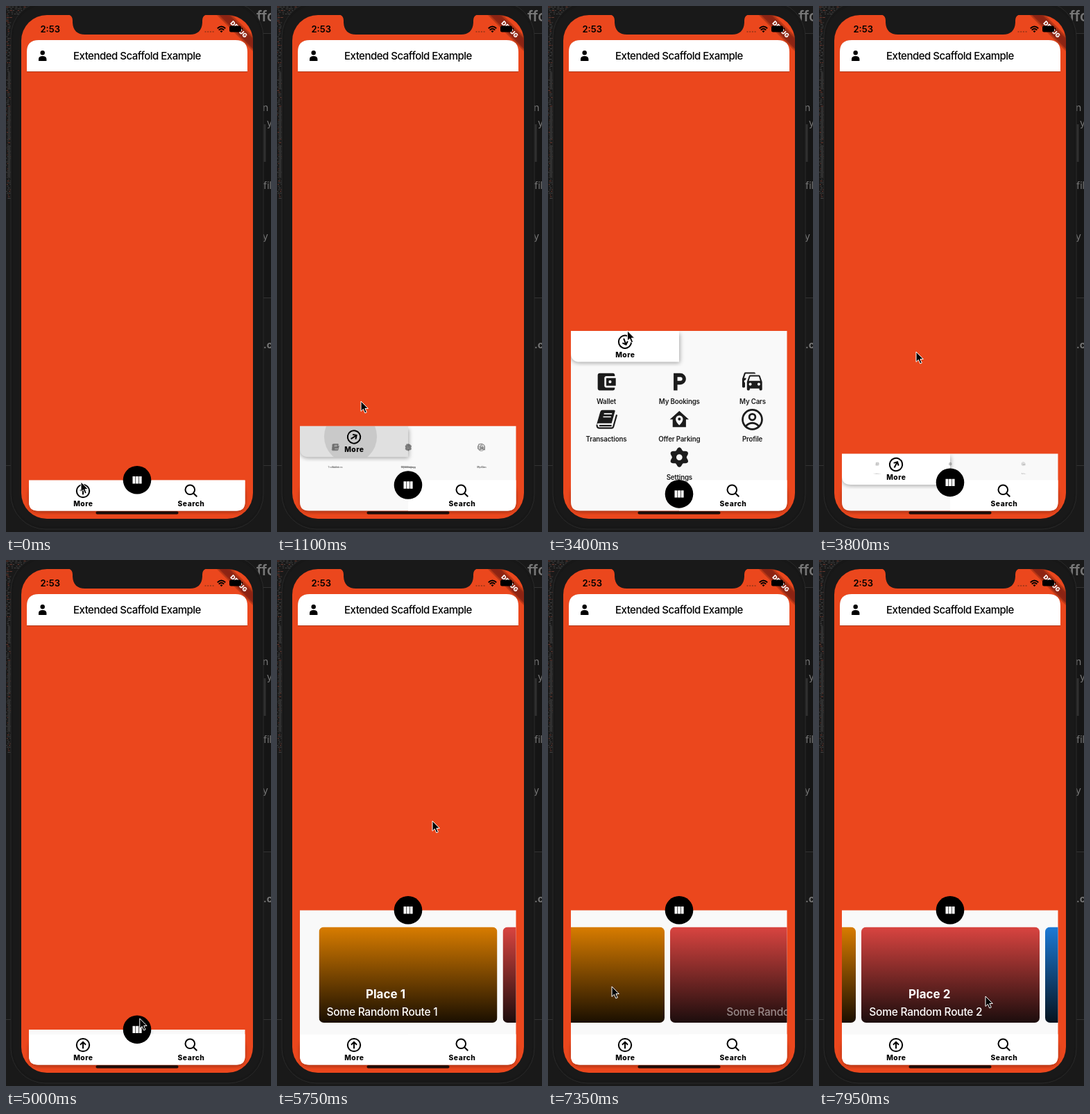
These frames come from a looping animation (382 by 756 pixels, 8000 ms). An HTML page:

```html
<!DOCTYPE html>
<html lang="en">
<head>
<meta charset="utf-8">
<title>Extended Scaffold Example</title>
<style>
html, body { margin: 0; width: 100%; height: 100%; overflow: hidden; background: #191919; }
svg { display: block; width: 100vw; height: 100vh; }
text { font-family: Inter, Roboto, sans-serif; }
.nav { font-size: 10.3px; font-weight: 800; letter-spacing: .5px; text-anchor: middle; }
.item { font-size: 11px; font-weight: 600; letter-spacing: -.2px; text-anchor: middle; fill: #1c1c1c; }
.line { fill: none; stroke: #000; stroke-width: 2; }
.place { font-size: 17px; font-weight: 700; }
.route { font-size: 15.5px; font-weight: 500; letter-spacing: -.25px; }
.side { fill: #777; font-size: 14px; }
</style>
</head>
<body>
<svg viewBox="0 0 382 756">
  <defs>
    <clipPath id="screenClip"><rect x="22" y="13" width="334" height="724" rx="37"/></clipPath>
    <clipPath id="panelClip"><path id="panelShape"/></clipPath>
    <clipPath id="tabClip"><path d="M33 0H189V44.5H46Q33 44.5 33 32Z"/></clipPath>
    <filter id="blur"><feGaussianBlur stdDeviation="3"/></filter>
  </defs>

  <rect width="382" height="756" fill="#191919"/>
  <rect x="372" y="40" width="10" height="380" fill="#151515"/>
  <path d="M366 39.5H382M366 419.5H382M366 660.5H382M0 660.5H10" stroke="#333"/>
  <g id="specks"></g>
  <path d="M4.5 95V120M4.5 145V191M4.5 200V247M373 170V224" stroke="#303030" stroke-width="3"/>
  <g class="side">
    <text x="361" y="22" font-size="21" font-weight="600">ffold</text>
    <text x="370" y="151">n</text>
    <text x="376" y="173">y</text>
    <text x="371" y="263">file</text>
    <text x="370" y="336">y</text>
    <text x="371" y="492" font-weight="700">.co</text>
  </g>
  <rect x="7" y="-6" width="364" height="758" rx="50" fill="#171717" stroke="#2a2a2a"/>
  <rect x="10" y="-1" width="358" height="749" rx="46" fill="#191919"/>

  <g clip-path="url(#screenClip)">
    <rect x="22" y="13" width="334" height="724" fill="#eb471d"/>
    <path d="M88 12Q96 13 96 21V24Q97 41 114 41H265Q282 41 283 24V21Q283 13 291 12Z" fill="#191919"/>
    <text x="49.5" y="38" font-size="13" font-weight="600">2:53</text>
    <path d="M286.5 37H300" stroke="#a83818" stroke-width="2" stroke-dasharray="2 1.7"/>
    <g transform="translate(356 13) rotate(45)">
      <rect x="-40" y="23" width="80" height="12" fill="#000" opacity=".5" filter="url(#blur)"/>
      <rect x="-40" y="24" width="80" height="10.3" fill="#8f2415" opacity=".8"/>
      <text y="32" font-size="8.7" font-weight="900" fill="#fff" text-anchor="middle">DEBUG</text>
    </g>
    <path d="M304.8 32.3Q310.5 26.8 316.2 32.3M306.8 34.6Q310.5 31 314.2 34.6" class="line" stroke-width="1.8"/>
    <path d="M308.5 36Q310.5 34.3 312.5 36L310.5 38.2Z"/>
    <rect x="322" y="28.5" width="17" height="9" rx="2.5"/>
    <path d="M340.5 31.5V34.5" stroke="#000" stroke-width="1.2"/>

    <path d="M30 95V66Q30 49 47 49H331Q348 49 348 66V95Z" opacity=".25"/>
    <path d="M30 94V66Q30 49 47 49H331Q348 49 348 66V94Z" fill="#fff"/>
    <circle cx="52.7" cy="67.3" r="3.2"/>
    <path d="M47 79V76Q47.3 72 52.7 72T58.4 76V79Z"/>
    <text x="97" y="77" font-size="15" font-weight="500" letter-spacing="-.5">Extended Scaffold Example</text>

    <rect x="34" y="690" width="310" height="37" rx="12" opacity=".35" filter="url(#blur)"/>
    <g clip-path="url(#panelClip)">
      <rect x="33" y="400" width="312" height="326" fill="#f9f9f9"/>
      <g id="cards"></g>
      <path id="navRight" d="M189 681.5H345V726H189Z" fill="#fff"/>
      <g id="tab">
        <path id="tabShadow" d="M33 4H190V46H46Q33 46 33 34Z" filter="url(#blur)"/>
        <g clip-path="url(#tabClip)">
          <rect x="33" width="156" height="45" fill="#fff"/>
          <g id="press">
            <rect x="33" width="156" height="45" opacity=".12"/>
            <circle id="ripple" cx="106" cy="15" opacity=".1"/>
          </g>
        </g>
        <g id="arrow" class="line">
          <circle r="9.2"/>
          <path d="M0 5.2V-4M-4 -.3L0 -4.3L4 -.3"/>
        </g>
        <text x="111.3" y="37.5" class="nav">More</text>
      </g>
      <g id="items"></g>
      <circle cx="265.3" cy="695.3" r="6.8" class="line"/>
      <path d="M270.2 700.2L275.3 705.3" class="line"/>
      <text x="267" y="718.7" class="nav">Search</text>
    </g>
    <rect x="129.500" y="726.300" width="119" height="4.200" rx="2.100" fill="#1d0d09"/>
    <g id="fab">
      <circle r="20.300"/>
      <path d="M-6.500 -5.200h3.900v10.400h-3.900zM-1.900 -5.200h3.900v10.400h-3.900zM2.700 -5.200h3.900v10.400h-3.900z" fill="#fff"/>
    </g>
  </g>
  <path id="cursor" d="M0 0V14.500L3.400 11.400L5.800 17L8.300 16L5.900 10.500H10.300Z" stroke="#fff" stroke-width="1"/>
</svg>
<script>
const $ = id => document.getElementById(id);
const clamp = v => Math.max(0, Math.min(1, v));
const ease = u => u < .5 ? 2 * u * u : 1 - 2 * (1 - u) ** 2;
const ramp = (t, start, length) => ease(clamp((t - start) / length));
const move = (el, x, y, more = '') => el.setAttribute('transform', `translate(${x} ${y}) ${more}`);

// Eased position along [time, x, y] stops
function along(stops, t) {
  let i = 1;
  while (i < stops.length - 1 && t > stops[i][0]) i++;
  const a = stops[i - 1], b = stops[i];
  const u = ramp(t, a[0], b[0] - a[0]);
  return a.slice(1).map((v, k) => v + (b[k + 1] - v) * u);
}

// Dim editor text behind the phone
let seed = 7;
const random = () => (seed = seed * 16807 % 2147483647) / 2147483647;
let specks = '';
for (let y = 1; y < 278; y += 2.5) {
  const wide = y < 12 ? 32 : 6;
  for (let x = random() * 3; x < wide; x += 3 + random() * 4)
    specks += `<rect x="${x}" y="${y}" width="${1 + random() * 3}" height="1" fill="${random() < .3 ? '#6b3a30' : '#454545'}"/>`;
}
$('specks').innerHTML = specks;

const gear = Array.from({length: 72}, (_, i) => {
  const a = i * Math.PI / 36, r = 9 + 1.4 * Math.cos(6 * a);
  return `${12 + r * Math.sin(a)} ${12 - r * Math.cos(a)}`;
}).join('L');

const shape = d => `<path fill-rule="evenodd" d="${d}"/>`;
const icons = {
  wallet: shape('M21 18v1c0 1.1-.9 2-2 2H5c-1.1 0-2-.9-2-2V5c0-1.1.9-2 2-2h14c1.1 0 2 .9 2 2v1h-9c-1.1 0-2 .9-2 2v8c0 1.1.9 2 2 2zM12 16h10V8H12zM16 13.5a1.5 1.5 0 0 1 0-3a1.5 1.5 0 0 1 0 3z'),
  parking: shape('M13 3H6v18h4v-6h3a6 6 0 0 0 0-12zM13.2 11H10V7h3.2a2 2 0 0 1 0 4z'),
  cars: shape('M8 11L9.5 6.5H18.5L20 11ZM18.5 16a1.5 1.5 0 0 1 0-3a1.5 1.5 0 0 1 0 3ZM9.5 16a1.5 1.5 0 0 1 0-3a1.5 1.5 0 0 1 0 3ZM19.9 6Q19.500 5 18.500 5H9.500Q8.500 5 8.100 6L6 12V20Q6 21 7 21H8Q9 21 9 20V19H19V20Q19 21 20 21H21Q22 21 22 20V12Z')
    + shape('M14.900 3Q14.500 2 13.500 2H4.500Q3.500 2 3.100 3L1 9V17Q1 18 2 18H3Q4 18 4 17V12.900Q2.800 12.300 3.100 11Q3.500 10 4.600 10L5.300 8H3L4.500 3.500H15.100Z'),
  book: shape('M7.600 2H20.300Q21.600 2 21.200 3.400L17.600 16H4.200Q1.800 16 1.600 18L5.600 4Q6.200 2 7.600 2Z')
    + '<path d="M2.200 17.300Q2 20.800 4.500 21H17.600Q19 21 19.400 19.700L23 7M4.600 18.400H17.600" fill="none" stroke="#1c1c1c" stroke-width="1.600"/><path d="M9.600 6H18M8.700 9.200H17" stroke="#f9f9f9" stroke-width="1.200"/>',
  home: shape('M12 3L2 12H5V20H19V12H22ZM12 7.700a3.800 3.800 0 0 1 3.800 3.800C15.800 14.500 12 18 12 18S8.200 14.500 8.200 11.500A3.800 3.800 0 0 1 12 7.700ZM12 10a1.500 1.500 0 0 0 0 3a1.500 1.500 0 0 0 0-3Z'),
  profile: '<g fill="none" stroke="#1c1c1c" stroke-width="2"><circle cx="12" cy="12" r="10.200"/><circle cx="12" cy="9.300" r="3.200"/><path d="M5.300 18.800Q8 15.600 12 15.600T18.700 18.800"/></g>',
  gear: shape(`M${gear}ZM12 8.800a3.200 3.200 0 0 0 0 6.400a3.200 3.200 0 0 0 0-6.400Z`)
};
const items = [
  ['wallet', 'Wallet', 84, 0], ['parking', 'My Bookings', 189.300, 0], ['cars', 'My Cars', 295, 0],
  ['book', 'Transactions', 84, 1], ['home', 'Offer Parking', 189.300, 1], ['profile', 'Profile', 294.500, 1],
  ['gear', 'Settings', 189.300, 2]
];
$('items').innerHTML = items.map(([icon, label]) =>
  `<g fill="#1c1c1c"><g transform="scale(1.55) translate(-12 -12)">${icons[icon]}</g></g><text class="item">${label}</text>`).join('');

const pitch = 265;
const colors = [['#d87c00', '#1a0f00'], ['#d94440', '#1c0d0d'], ['#1c7ad6', '#05131f']];
$('cards').innerHTML = colors.map(([top, end], i) => `<g>
  <linearGradient id="shade${i}" x2="0" y2="1"><stop stop-color="${top}"/><stop offset="1" stop-color="${end}"/></linearGradient>
  <clipPath id="card${i}"><rect width="257" height="137.500" rx="7"/></clipPath>
  <g clip-path="url(#card${i})" fill="#fff"><rect width="257" height="137.500" fill="url(#shade${i})"/>
  <text y="102" class="place">Place ${i + 1}</text><text y="127" class="route">Some Random Route ${i + 1}</text></g></g>`).join('');
const cards = [...$('cards').children];

const pointer = [
  [0, 108, 684], [700, 108, 684], [1100, 121, 568], [1750, 152, 419], [2300, 152, 419],
  [2650, 107, 458], [3200, 107, 458], [3800, 140, 497], [4000, 162, 640], [4500, 190, 684],
  [4850, 190, 684], [5600, 224, 375], [5850, 224, 375], [6550, 242, 626], [6750, 242, 626],
  [7350, 92, 613], [7500, 92, 613], [7900, 240, 627], [8000, 240, 627]
];
const swipe = [[0, 0], [6750, 0], [7350, 149.500], [7800, 264.500], [8000, 264.500]];

function draw(t) {
  const menu = ramp(t, 750, 877) - ramp(t, 3200, 835);
  const drawer = ramp(t, 4900, 750);
  const tabTop = 681.500 - 242.500 * menu;
  const top = tabTop - 178 * drawer;
  $('panelShape').setAttribute('d', `M33 ${top}H344.500V713Q344.500 725.500 332 725.500H46Q33 725.500 33 713Z`);
  move($('tab'), 0, tabTop);
  $('tabShadow').setAttribute('opacity', .35 * clamp(menu * 6));
  move($('arrow'), 111, 15.600, `rotate(${180 * menu})`);
  move($('fab'), 189, 681.300 + 22.700 * menu - 178 * drawer);

  $('press').setAttribute('opacity', clamp((t - 600) / 150) * (1 - clamp((t - 1450) / 250)));
  $('ripple').setAttribute('r', clamp((t - 600) / 1500) * 114);

  // Rows unfold from one stack while the menu grows
  const nodes = $('items').children;
  const spread = clamp((menu - .318) / .682);
  $('items').setAttribute('opacity', clamp(menu * 1.600));
  $('items').style.display = menu > 0 ? '' : 'none';
  items.forEach(([, , x, row], i) => {
    const y = tabTop + 94 * menu * (1 - spread) + (71 + 65.300 * row) * spread;
    move(nodes[2 * i], x, y, `scale(${menu})`);
    move(nodes[2 * i + 1], x, y + Math.min(28.500, 90 * menu), `scale(${menu}) translate(0 4)`);
  });

  const [scroll] = along(swipe, t);
  $('cards').style.display = drawer > 0 ? '' : 'none';
  $('cards').setAttribute('opacity', drawer);
  move($('cards'), 189, top + 89 * drawer, `scale(${drawer}) translate(-189 -592.500)`);
  cards.forEach((card, i) => {
    const x = pitch * i - scroll, off = x / pitch;
    move(card, 60.500 + x, 527.500);
    const [place, route] = card.querySelectorAll('text');
    place.setAttribute('x', 67.500 + 300 * off);
    route.setAttribute('x', 11 + 161 * off);
    place.setAttribute('opacity', clamp(1 - 2 * Math.abs(off)));
    route.setAttribute('opacity', clamp(1 - 1.150 * Math.abs(off)));
  });

  move($('cursor'), ...along(pointer, t));
}

function frame(now) {
  draw(now % 8000);
  requestAnimationFrame(frame);
}
draw(0);
requestAnimationFrame(frame);
</script>
</body>
</html>
```
